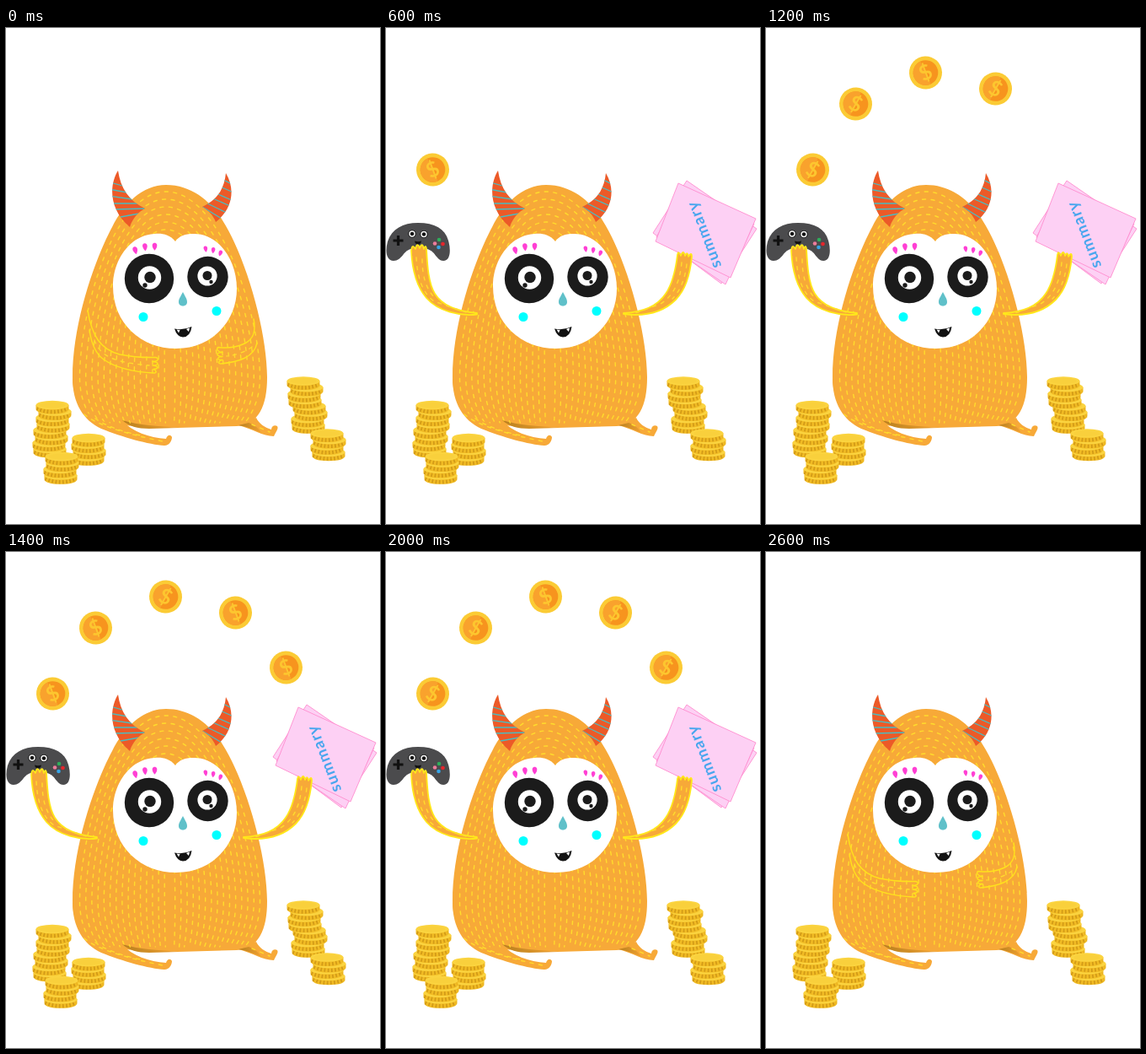
Recreate the animation shown at these times as an HTML page. Size 444 by 588 pixels, loop 3.1 s.

```html
<!DOCTYPE html>
<html lang="en">
<head>
<meta charset="utf-8">
<title>Juggling monster</title>
<style>
  html, body { margin: 0; width: 100%; height: 100%; overflow: hidden; background: #fff; }
  svg { display: block; width: 100%; height: 100%; }
  .fur { fill: #f7a938; }
  .hair { fill: none; stroke: #ffdc2c; stroke-width: 1.4; stroke-linecap: round; stroke-dasharray: 4 6.5; }
  .arm { fill: #f7a938; stroke: #ffe81a; stroke-width: 1.8; stroke-linejoin: round; stroke-linecap: round; }
  .fold { fill: none; stroke: #ffe11c; stroke-width: 1.5; stroke-linejoin: round; stroke-linecap: round; }
  .sheet { fill: #fdd0f4; stroke: #ff8ed0; stroke-width: .9; }
  .horn { fill: #ec5a28; }
  .stripe { fill: none; stroke: #4bbcc0; stroke-width: 1.3; }
</style>
</head>
<body>
<svg viewBox="0 0 444 588">
  <defs>
    <path id="body" d="M190 186C162 186 140 208 126 236C105 275 79 350 79 414C79 448 100 466 135 471L204 474L274 472C300 470 310 448 310 414C310 360 285 272 257 228C243 205 220 186 190 186Z"/>
    <path id="horns" d="M133 169C123 185 121 214 147 236C150 226 157 218 165 214C146 205 136 190 133 169ZM261 172C272 190 270 214 249 230C246 222 240 216 233 212C250 204 259 192 261 172Z"/>
    <clipPath id="inside"><use href="#body"/></clipPath>
    <clipPath id="hornClip"><use href="#horns"/></clipPath>
    <path id="lash" d="M0 4.800C-4.300 0 -3.200 -4.300 0 -4.300C3.200 -4.300 4.300 0 0 4.800Z" fill="#ff3fd4"/>
    <linearGradient id="shade"><stop stop-color="#b8801f"/><stop offset="1" stop-color="#f0a030"/></linearGradient>
  </defs>

  <g id="stacks"></g>

  <!-- legs and body -->
  <path class="fur" d="M79 415C79 445 92 465 113 475C138 485 170 494 188 495C194 495 197 489 197 485C195 481 191 483 190 487C170 486 150 478 138 466Z"/>
  <path class="fur" d="M276 471C292 475 305 484 318 484C320 479 324 475 322 472C319 470 315 472 315 476C308 474 300 469 297 462Z"/>
  <use href="#body" class="fur"/>
  <path fill="url(#shade)" d="M138 465C146 472 156 475 170 475L206 474C180 472 158 471 138 465Z"/>
  <path fill="url(#shade)" d="M276 471C288 473 296 477 303 480C300 474 294 470 288 468Z"/>
  <g id="hairs" clip-path="url(#inside)"></g>
  <path class="hair" d="M93 458Q112 475 186 490M106 463Q125 476 160 483M292 470L313 479"/>

  <!-- horns -->
  <use href="#horns" class="horn"/>
  <path class="stripe" clip-path="url(#hornClip)" d="M124 183L138 187M122 191L144 195M122 199L150 203M124 208L156 208M128 215L168 214M136 224L158 220M256 179L270 186M252 187L270 195M247 195L270 205M243 201L266 211M237 207L262 219M233 212L256 226"/>

  <!-- face -->
  <path fill="#fff" d="M201 253C194 244 184 243 176 244C146 246 127 276 127 306C127 350 160 380 202 380C244 380 274 348 274 309C274 275 252 243 222 244C213 244 206 246 201 253Z"/>
  <g id="eyes"></g>
  <use href="#lash" transform="translate(153.5 263.5) rotate(-15)"/>
  <use href="#lash" transform="translate(165 259.5) rotate(-6)"/>
  <use href="#lash" transform="translate(176.5 259)"/>
  <use href="#lash" transform="translate(237 262) rotate(-10) scale(.8)"/>
  <use href="#lash" transform="translate(246 263.5) rotate(6) scale(.8)"/>
  <use href="#lash" transform="translate(254.5 267) rotate(20) scale(.8)"/>
  <path fill="#5fc0c9" d="M210 313C207 319 205 321 205 325C205 331 215 331 215 325C215 321 213 319 210 313Z"/>
  <circle cx="163" cy="342.5" r="5.5" fill="#0ff"/>
  <circle cx="250" cy="335.5" r="5.5" fill="#0ff"/>
  <path fill="#111" d="M200 356.500Q210 359 220.500 354Q219 366 210 366.500Q203 366 200 356.500Z"/>
  <path fill="#fff" d="M202.500 357.500L206.500 358L205 361.500ZM214 357L218 355.500L217 360Z"/>

  <g id="rest">
    <path class="fold" d="M97 335C102 365 112 381 135 387C150 390 163 391 178 390.500C182 392 181 395 174 395.500M174 395.500C182 396 182 400 174 400M174 400C182 401 181 404 175 404.500C179 406 179 409 176 409C155 408 132 404 116 393C106 386 101 372 99 358"/>
    <path class="fold" d="M294 345C297 360 294 370 281 375C274 378 264 380 252 378.500C249 380 251 384 257 384.500C249 385 249 389 257 389.500C250 390 250 394 257 393.500C251 395 252 398 255 398C275 396 295 391 298 373"/>
    <path class="hair" d="M105 370C113 394 140 397 170 400M292 378Q280 387 262 389"/>
  </g>

  <g id="show">
    <!-- game pad -->
    <path fill="#4b4b4d" d="M38 231C58 231 70 238 74 252C77 262 77 276 68 276C60 276 58 263 48 262L30 262C21 263 19 276 9 276C0 276 -1 264 2 253C7 238 20 231 38 231Z"/>
    <path stroke="#111" stroke-width="3.2" d="M8.500 252H20.500M14.500 246V258"/>
    <g id="pad"></g>
    <path fill="#111" d="M34 252.500Q38 254 42 252.500Q41 257 38 257Q35 257 34 252.500Z"/>

    <!-- papers -->
    <path class="sheet" d="M357 181L440 238L398 303L317 243Z"/>
    <path class="sheet" d="M352 190L437 232L403 304L321 248Z"/>
    <path class="sheet" d="M347 184L439 226L409 296L320 253Z"/>
    <text transform="translate(398.5 282) rotate(-111)" font-family="Lato, sans-serif" font-size="18.5" font-weight="bold" letter-spacing="1.2" fill="#49a6ee">summary</text>

    <!-- raised arms -->
    <path class="arm" d="M108 338C84 336 66 328 58 315C50 302 49 280 48 262Q47 256 45 262Q43 253 40 261Q37 253 35 262Q31 255 30 264C31 285 36 306 48 320C62 336 88 342 108 339.500Z"/>
    <path class="arm" d="M282 338C305 337 322 330 332 315C341 302 344 285 346 269Q347 263 350 270Q353 262 355 270Q358 264 359 271Q363 265 363 271C361 293 356 310 344 322C328 338 305 342 282 339Z"/>
    <path class="fur" d="M31 270L47 270L47 261Q45 264 44 264Q42 257 40 264Q37 257 35 264Q32 260 31 264ZM347 274L362 274L362 270Q360 272 359 273Q357 267 355 273Q353 265 350 273Q348 268 347 272Z"/>
    <path class="hair" d="M36 272C37 295 43 314 57 324L95 337M43 274C43 295 48 310 58 320M351 278C349 300 342 317 326 327L296 338M357 280C355 298 349 312 340 321"/>
    <g id="coins"></g>
  </g>
</svg>
<script>
const $ = id => document.getElementById(id);
const fill = (id, parts) => { $(id).innerHTML = parts.join(''); };
const dot = (x, y, r, color) => `<circle cx="${x}" cy="${y}" r="${r}" fill="${color}"/>`;

// Coin piles: x of each coin from the top down, y of the top coin
function stack(y, xs) {
  return xs.map((x, i) => {
    const cy = y + i * 7.4, l = x - 19.5, r = x + 19.5;
    return `<path d="M${l} ${cy}V${cy + 4.5}Q${l + 1} ${cy + 10.5} ${x} ${cy + 10.5}T${r} ${cy + 4.5}V${cy}Z" fill="#f1bb24"/>
      <path d="M${l + 1} ${cy + 4}Q${x} ${cy + 12} ${r - 1} ${cy + 4}" fill="none" stroke="#d29a17" stroke-width="4.4" stroke-dasharray="1.7 2.5"/>
      <ellipse cx="${x}" cy="${cy}" rx="19.5" ry="5.3" fill="#fbd440"/>
      <ellipse cx="${x}" cy="${cy}" rx="15.5" ry="3.6" fill="#f9d03c"/>`;
  }).reverse().join('');
}
fill('stacks', [
  stack(447, [55, 58, 55, 56, 52, 54, 51, 52]),
  stack(486, [98, 97, 99, 97]),
  stack(508, [66, 67, 64, 65]),
  stack(418.5, [353, 357, 354, 355, 360, 362, 358, 359]),
  stack(480.5, [381, 384, 381, 383])
]);

// Nested arches of short hairs
fill('hairs', Array.from({ length: 15 }, (_, k) => {
  const w = 107 - 7.2 * k, top = 194 + 9 * k, l = 194.5 - w, r = 194.5 + w;
  return `<path class="hair" stroke-dashoffset="${k * 4.7 % 10.5}" d="M${l + w / 6} 468Q${l} 445 ${l} 414C${l} 340 ${190 - w * .6} ${top} 190 ${top}S${r} 340 ${r} 414Q${r} 445 ${r - w / 6} 468"/>`;
}));

const ink = '#1b1b1b';
fill('eyes', [
  dot(170, 297, 29.2, ink), dot(170.5, 296, 13.7, '#fff'), dot(171, 295.5, 6.7, ink), dot(165, 305, 2.7, ink),
  dot(239.5, 295, 24.2, ink), dot(239, 294, 11.6, '#fff'), dot(239, 293.5, 5.5, ink), dot(243.5, 301, 2.2, ink)
]);
fill('pad', [
  ...[[31, 244], [45, 244.5]].flatMap(([x, y]) => [dot(x, y, 4.6, '#111'), dot(x, y, 3.7, '#fff'), dot(x, y, 2.3, '#111')]),
  dot(63, 251, 2.3, '#2eae5b'), dot(67.5, 256, 2.3, '#e5262c'), dot(62.5, 260, 2.3, '#35a5e8'), dot(58, 255.5, 2.3, '#ee7c9c')
]);

// Juggled coins: position and first lean
const coins = [[55.5, 168, -1], [106.5, 90, -1], [189.5, 53, 1], [272.5, 72, -1], [332.5, 137, -1]];
fill('coins', coins.map(() => `<g>${dot(0, 0, 19.5, '#fbcb35')}${dot(0, 0, 14.8, '#f7941e')}
  <path d="M0 -14.8A14.8 14.8 0 0 0 0 14.8Z" fill="#f9a22d"/>
  <text y="8.6" text-anchor="middle" font-family="Lato, sans-serif" font-weight="bold" font-size="25" fill="#fdc62f">$</text></g>`));
const coinNodes = [...$('coins').children];

function draw(now) {
  const t = now % 3100;
  const up = t >= 100 && t < 2600;
  $('show').style.display = up ? '' : 'none';
  $('rest').style.display = up ? 'none' : '';
  const beat = Math.floor((t - 600) / 200);
  coinNodes.forEach((node, i) => {
    const [x, y, lean] = coins[i];
    node.style.display = beat >= i ? '' : 'none';
    node.setAttribute('transform', `translate(${x} ${y}) rotate(${25 * lean * (beat % 2 ? -1 : 1)})`);
  });
}

const start = performance.now();
function loop() {
  draw(performance.now() - start);
  requestAnimationFrame(loop);
}
loop();
</script>
</body>
</html>
```
